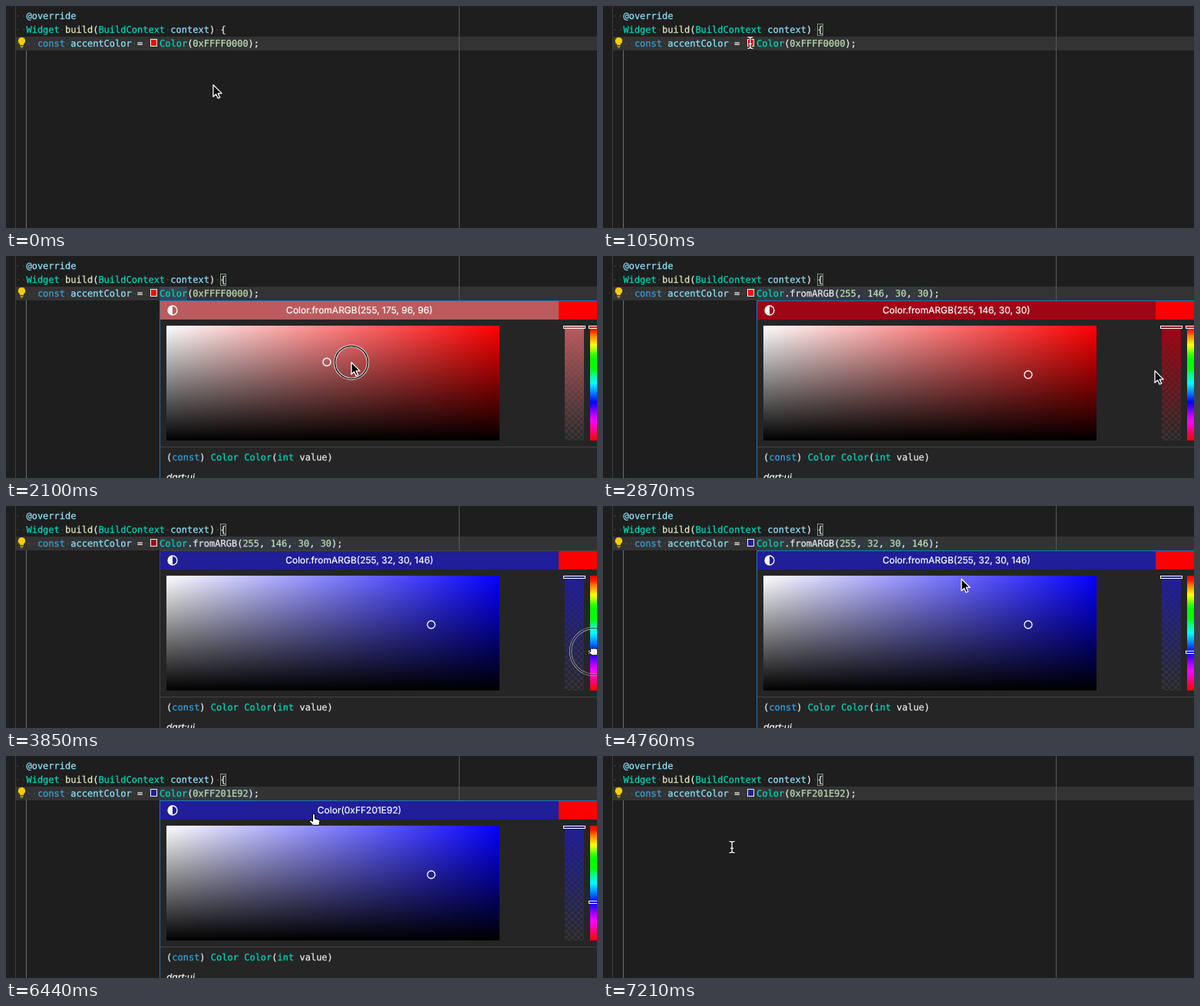
Recreate the animation shown at these times as an HTML page. Size 770 by 290 pixels, loop 7280 ms.

```html
<!DOCTYPE html>
<html lang="en">
<head>
<meta charset="utf-8">
<title>Colour picker in a code editor</title>
<style>
  html, body { margin: 0; width: 100%; height: 100%; overflow: hidden; background: #1e1e1e; }
  svg { display: block; width: 770px; height: 290px; text-rendering: geometricPrecision; }
  .code { font: 12px "DejaVu Sans Mono", monospace; stroke-width: .25px; }
  .ui { font: 12px Inter, sans-serif; fill: #fff; stroke: #fff; stroke-width: .2px; }
  .note { font-style: italic; }
</style>
</head>
<body>
<svg viewBox="0 0 770 290">
  <defs>
    <linearGradient id="tint">
      <stop stop-color="#fff"/><stop id="pure" offset="1"/>
    </linearGradient>
    <linearGradient id="shade" x2="0" y2="1">
      <stop stop-opacity="0"/><stop offset="1"/>
    </linearGradient>
    <linearGradient id="fade" x2="0" y2="1">
      <stop class="solid"/><stop class="solid" offset="1" stop-opacity="0"/>
    </linearGradient>
    <linearGradient id="hues" x2="0" y2="1"></linearGradient>
    <pattern id="checker" width="8" height="8" x="728" y="91" patternUnits="userSpaceOnUse">
      <rect width="8" height="8" fill="#272727"/>
      <path d="M0 0h4v8h4V4H0z" fill="#353535"/>
    </pattern>
    <clipPath id="field"><rect x="203" y="91" width="450" height="150"/></clipPath>
    <path id="stem" d="M-3.5-7.500Q-.5-7.500 0-6Q.5-7.500 3.500-7.500M0-6V6M-3.500 7.500Q-.5 7.500 0 6Q.5 7.500 3.500 7.500M-2 1.500h4"/>
  </defs>

  <rect width="770" height="290" fill="#1e1e1e"/>
  <rect x="12" y="40" width="758" height="18" fill="#333"/>
  <path d="M12.5 0V290" stroke="#404040"/>
  <path d="M26.5 58V290" stroke="#707070"/>
  <path d="M590.5 0V290" stroke="#5a5a5a"/>
  <rect id="range" x="200" y="40" height="18" fill="#3a6080"/>
  <rect id="bracket" x="279.5" y="23.5" width="7" height="15" fill="#1d2b1d" stroke="#888"/>
  <g id="lines"></g>
  <g id="value"></g>
  <rect id="swatch" x="188.5" y="43.5" width="8" height="9" stroke="#eee"/>
  <path d="M20.5 41a4.6 4.6 0 0 0-2.5 8.5V51h5v-1.5a4.6 4.6 0 0 0-2.5-8.5z" fill="#fc0"/>
  <path d="M18.3 52.5h4.4M19 54.2h3" stroke="#d8b030"/>

  <g id="picker">
    <rect id="frame" x="200.5" y="58.5" width="580" height="250" fill="#252526"/>
    <rect id="header" x="201" y="59" width="519" height="24"/>
    <rect x="720" y="59" width="50" height="24" fill="#f00"/>
    <g id="caption">
      <circle cx="217" cy="71" r="6" fill="none" stroke="#fff" stroke-width="1.3"/>
      <path d="M217 65a6 6 0 0 0 0 12z" fill="#fff"/>
      <text id="label" class="ui" x="460.5" y="75" text-anchor="middle"></text>
    </g>
    <rect x="209" y="91" width="434" height="150" fill="url(#tint)"/>
    <rect x="209" y="91" width="434" height="150" fill="url(#shade)"/>
    <g clip-path="url(#field)">
      <circle id="dot" r="5" fill="none" stroke="#fff" stroke-width="1.3"/>
    </g>
    <rect x="728" y="91" width="25" height="150" fill="url(#checker)"/>
    <rect x="728" y="91" width="25" height="150" fill="url(#fade)"/>
    <rect x="761" y="91" width="25" height="150" fill="url(#hues)"/>
    <rect x="726.5" y="91.5" width="28" height="3" fill="none" stroke="#fff"/>
    <rect id="hueMark" x="759.5" width="28" height="3" fill="none" stroke="#fff"/>
    <path d="M201 249.5H770" stroke="#434343"/>
    <g id="docs"></g>
    <text class="ui note" x="209" y="293">dart:ui</text>
  </g>

  <g id="ring" fill="none">
    <circle stroke="#fff" stroke-width="3.2"/>
    <circle stroke="#111" stroke-width="1.6"/>
  </g>
  <g id="pointer" stroke-linejoin="round">
    <path id="arrow" d="M0 0V15.5l3.6-3.4 2.5 5.5 2.6-1.2-2.5-5.3h5z" fill="#000" stroke="#fff" stroke-width="1.3"/>
    <g id="beam" fill="none">
      <use href="#stem" stroke="#000" stroke-width="3"/>
      <use href="#stem" stroke="#fff" stroke-width="1.4"/>
    </g>
    <path id="hand" d="M-1.5 1a1.5 1.5 0 0 1 3 0V6l5 1.2q1.6.5 1.4 2.2l-1 5H-1.2L-5.5 9.5q0-2 2-1.4l2 1.4z" fill="#fff" stroke="#000"/>
    <path id="grab" d="M-4.5-3q1-2 2.5-.5q1-1.6 2.5 0q1.2-1.4 2.5.2q2-.8 2.3 1.3v3l-1.5 4h-6L-6.5 2q-.6-2 2-1.5z" fill="#fff" stroke="#000"/>
  </g>
</svg>
<script>
const LOOP = 7280, STEP = 70, CHAR = 7.224;
const FIELD = { x: 209, y: 91, w: 434, h: 150 };
const OPEN = 1190, CLOSE = 7000;
const $ = id => document.getElementById(id);
const clamp = (v, lo = 0, hi = 1) => Math.min(hi, Math.max(lo, v));

// Pointer route: time, x, y
const ROUTE = [
  [0, 270, 103], [70, 273, 95], [210, 292, 42], [280, 296, 31], [560, 296, 31],
  [700, 270, 35], [840, 218, 45], [980, 192, 48], [1400, 191, 48], [1540, 191, 48],
  [1680, 228, 66], [1820, 335, 115], [1960, 405, 138], [2030, 418, 138.5],
  [2100, 450, 139], [2240, 532, 152], [2310, 554, 155], [2520, 558, 155], [2660, 615, 153],
  [2870, 719, 150], [3080, 755, 118], [3360, 766, 91], [3430, 766, 91], [3570, 766, 130],
  [3710, 766, 191.4], [3780, 766, 190], [4200, 766, 190], [4410, 700, 165], [4690, 500, 105],
  [4900, 401, 76], [6720, 401, 76], [6860, 340, 85], [7000, 235, 105], [7140, 178, 117], [7210, 168, 119]
];
const CLICK = [280, 350], PICK = [1960, 2310], SLIDE = [3500, 3710];
const PRESSES = [CLICK, PICK, [3500, 3780], [5040, 5110], [5880, 5950]];

function pointerAt(t) {
  const i = ROUTE.findIndex(p => p[0] > t);
  if (i < 0) return ROUTE.at(-1).slice(1);
  const [t0, x0, y0] = ROUTE[i - 1], [t1, x1, y1] = ROUTE[i];
  const k = (t - t0) / (t1 - t0);
  return [x0 + (x1 - x0) * k, y0 + (y1 - y0) * k];
}

// Wide-gamut screen colour shown as sRGB
function screen([r, g, b]) {
  const lin = c => (c /= 255) <= 0.04045 ? c / 12.92 : ((c + 0.055) / 1.055) ** 2.4;
  const enc = c => (c = clamp(c), 255 * (c <= 0.0031308 ? c * 12.92 : 1.055 * c ** (1 / 2.4) - 0.055));
  const [R, G, B] = [r, g, b].map(lin);
  const out = [1.2249 * R - 0.2249 * G, 1.042 * G - 0.042 * R, 1.0983 * B - 0.0196 * R - 0.0786 * G];
  return `rgb(${out.map(c => Math.round(enc(c)))})`;
}

function hsv(h, s, v) {
  const part = n => {
    const k = (n + h / 60) % 6;
    return Math.round(255 * v * (1 - s * clamp(Math.min(k, 4 - k))));
  };
  return [part(5), part(3), part(1)];
}

const TOKENS = [
  [/^const$/, [86, 156, 214]],
  [/^(Color|Widget|BuildContext|int)$/, [82, 210, 184]],
  [/^build$/, [230, 230, 190]],
  [/^(0x\w+|\d+)$/, [196, 220, 184]],
  [/^(@override|context|accentColor)$/, [160, 224, 254]],
  [/./, [232, 232, 232]]
];

function codeMarkup(text, x, y, dots = true) {
  const lead = text.search(/\S/);
  const spans = text.trim().match(/@?\w+|\s+|[^\w\s@]/g).map(word => {
    const color = screen(TOKENS.find(([re]) => re.test(word))[1]);
    return `<tspan fill="${color}" stroke="${color}">${word}</tspan>`;
  }).join("");
  const marks = dots ? [...text].map((c, i) => c === " "
    ? `<circle cx="${x + (i + 0.5) * CHAR}" cy="${y - 4}" r=".8" fill="#555"/>` : "").join("") : "";
  return `${marks}<text class="code" x="${x + lead * CHAR}" y="${y}">${spans}</text>`;
}

$("lines").innerHTML = [
  "  @override",
  "  Widget build(BuildContext context) {",
  "    const accentColor = "
].map((line, i) => codeMarkup(line, 12, 17 + 18 * i)).join("");
$("docs").innerHTML = codeMarkup("(const) Color Color(int value)", 209, 267, false);
$("hues").innerHTML = Array.from({ length: 25 }, (_, i) =>
  `<stop offset="${i / 24}" stop-color="${screen(hsv(i * 15, 1, 1))}"/>`).join("");

const RED = [255, 0, 0], DARK_RED = [146, 30, 30], BLUE = [32, 30, 146];
const argb = c => `Color.fromARGB(255, ${c.join(", ")})`;
const rgbo = c => `Color.fromRGBO(${c.join(", ")}, 1)`;
const hex = c => `Color(0xFF${c.map(v => v.toString(16).padStart(2, "0")).join("").toUpperCase()})`;

function codeAt(t) {
  if (t < 2660) return hex(RED);
  if (t < 4060) return argb(DARK_RED);
  if (t < 5460) return argb(BLUE);
  return t < 6370 ? rgbo(BLUE) : hex(BLUE);
}

// Field position and hue set by the two drags
function pickedAt(t) {
  const [x, y] = t < PICK[0] ? [FIELD.x + FIELD.w, FIELD.y] : pointerAt(clamp(t, ...PICK));
  const slide = pointerAt(clamp(t, ...SLIDE))[1];
  const hue = t < SLIDE[0] ? 0 : clamp((slide - FIELD.y) / FIELD.h) * 360;
  const color = hsv(hue, (x - FIELD.x) / FIELD.w, 1 - (y - FIELD.y) / FIELD.h);
  return { x, y, hue, color };
}

function drawPicker(t) {
  const alpha = t < CLOSE ? clamp((t - OPEN + STEP) / 210) : clamp(1 - (t - CLOSE) / 140);
  $("picker").setAttribute("opacity", alpha);
  // The handles trail the pointer by one step, the colour by two
  const { x, y, hue } = pickedAt(t - STEP);
  const { color } = pickedAt(t - 2 * STEP);
  const shown = screen(color);
  $("header").setAttribute("fill", shown);
  document.querySelectorAll(".solid").forEach(s => s.setAttribute("stop-color", shown));
  $("pure").setAttribute("stop-color", screen(hsv(hue, 1, 1)));
  $("dot").setAttribute("cx", x);
  $("dot").setAttribute("cy", y);
  $("hueMark").setAttribute("y", Math.max(91.5, Math.round(FIELD.y + hue / 360 * FIELD.h) - 1.5));
  $("caption").style.display = t < 1680 ? "none" : "";
  $("label").textContent = (t < 5110 ? argb : t < 5950 ? rgbo : hex)(color);
  const focused = t >= PICK[0] && !(t >= SLIDE[0] && t < 4060);
  $("frame").setAttribute("stroke", focused ? "#1a78c2" : "#454545");
}

function drawCode(t) {
  const code = codeAt(t);
  $("value").innerHTML = codeMarkup(code + ";", 200, 53);
  $("swatch").setAttribute("fill", screen(t < 3220 ? RED : t < 4410 ? DARK_RED : BLUE));
  $("bracket").style.display = t < CLICK[1] ? "none" : "";
  const edited = t >= 2660;
  $("range").setAttribute("width", (edited ? code.length : 5) * CHAR);
  $("range").setAttribute("opacity", t < OPEN || t >= 7070 ? 0 : edited ? 0.15 : 0.4);
}

function pointerKind(t, x, y) {
  if (t < STEP) return "arrow";
  if (t < OPEN || x < 201 || y < 58) return "beam";
  if (x > 760) return "grab";
  return y < 83 ? "hand" : "arrow";
}

function drawPointer(t) {
  const [x, y] = pointerAt(t);
  const place = `translate(${x} ${y})`;
  $("pointer").setAttribute("transform", place);
  const kind = pointerKind(t, x, y);
  for (const id of ["arrow", "beam", "hand", "grab"]) $(id).style.display = id === kind ? "" : "none";

  const press = PRESSES.find(([down, up]) => t >= down && t < up + 140);
  $("ring").style.display = press ? "" : "none";
  if (!press) return;
  const spread = clamp((t - press[1]) / 140);
  $("ring").setAttribute("transform", place);
  $("ring").setAttribute("opacity", 1 - spread * 0.8);
  for (const c of $("ring").children) c.setAttribute("r", 21.5 + 18 * spread);
}

const start = performance.now();
function frame() {
  const t = Math.floor((performance.now() - start) % LOOP / STEP) * STEP;
  drawCode(t);
  drawPicker(t);
  drawPointer(t);
  requestAnimationFrame(frame);
}
frame();
</script>
</body>
</html>
```
